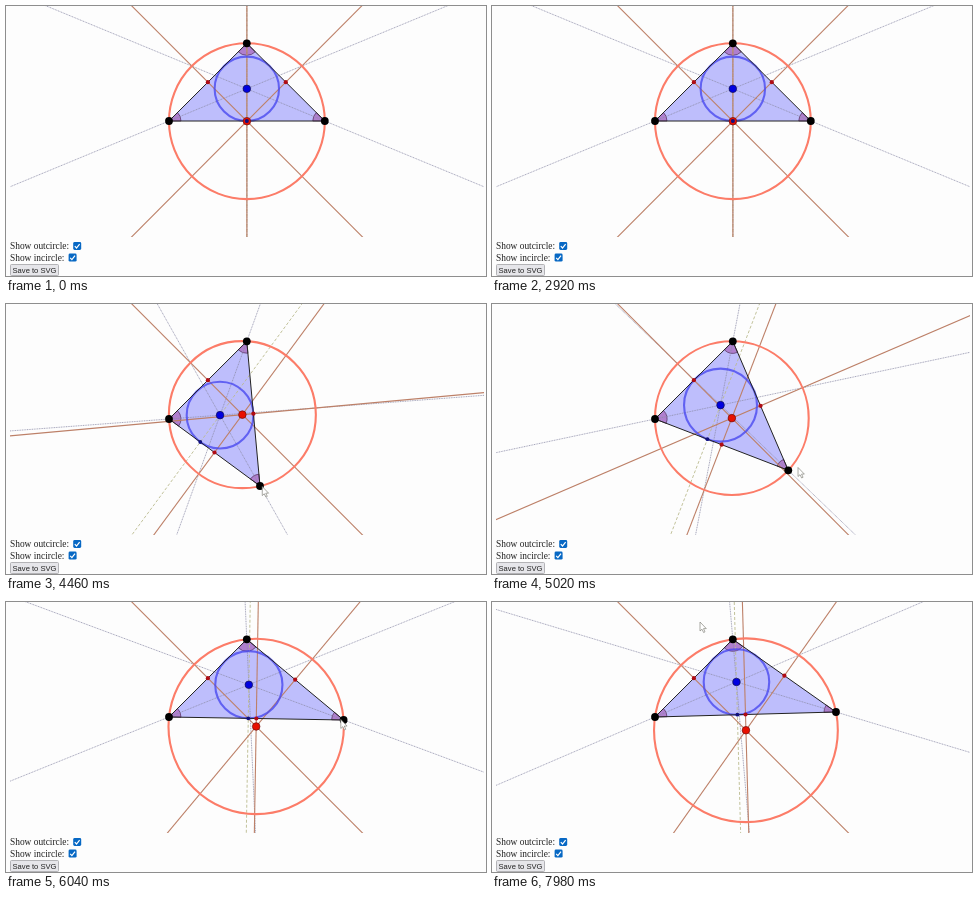
Write an HTML page that moves like this. It is 480x270 px and loops after 8 s.

```html
<!DOCTYPE html>
<html lang="en">
<head>
<meta charset="utf-8">
<title>Triangle circles</title>
<style>
  html, body { margin: 0; width: 100%; height: 100%; overflow: hidden; background: #fdfdfd; }
  svg { display: block; }
  #stage { width: 100vw; height: 100vh; }
  .label { font: 9.4px "Liberation Serif", serif; fill: #222; }
  .button { font: 7.6px "Liberation Sans", sans-serif; fill: #222; }
  #fill { fill: #bebefc; }
  .wedge { fill: #a040a080; stroke: #54305c; stroke-width: .7; }
  .bisector { stroke: #bd8068; stroke-width: 1.1; }
  .angle { stroke: #8c8ca8; stroke-width: .8; stroke-dasharray: 1 .7; }
  #drop { stroke: #bcbc90; stroke-width: .9; stroke-dasharray: 3 2; }
  #outcircle { fill: none; stroke: #fc7c68; stroke-width: 2.1; }
  #incircle { fill: none; stroke: #4848f0c8; stroke-width: 2.1; }
  #edges { fill: none; stroke: #222; stroke-width: 1; }
</style>
</head>
<body>
<svg id="stage" viewBox="0 0 480 270">
  <svg id="drawing" x="4" y="0" width="474" height="231" viewBox="4 0 474 231"></svg>
  <g class="label">
    <text x="4" y="243">Show outcircle:</text>
    <text x="4" y="254.7">Show incircle:</text>
  </g>
  <g id="box">
    <rect x="67.2" y="236" width="8" height="8" rx="1.4" fill="#0768c4"/>
    <path d="M68.8 240.2l1.7 1.8 3.1-3.9" fill="none" stroke="#fff" stroke-width="1.2"/>
  </g>
  <use href="#box" x="-4.6" y="11.6"/>
  <rect x="4.5" y="258.5" width="48" height="11" rx="1" fill="#e6e6ea" stroke="#a4a4a8" stroke-width=".8"/>
  <text class="button" x="28.5" y="267" text-anchor="middle">Save to SVG</text>
  <path id="cursor" d="M0 0V9L2 7.2 3.6 10.5 5 9.8 3.5 6.6H6.3Z" fill="#fff" stroke="#85857c" stroke-width=".7"/>
</svg>
<script>
const LOOP = 8000, GRAB = 2960, RELEASE = 7600;
const POINTER_LEAD = 80;
const A = [163, 115], B = [240.8, 37.3];
// time, x, y of the dragged corner
const drag = [
  [0, 318.8, 115], [GRAB, 318.8, 115], [3800, 294, 152], [4460, 254, 182],
  [5440, 332, 146], [5850, 342, 122], [6740, 305, 110], [RELEASE, 344, 110], [LOOP, 344, 110]
];
const drawing = document.getElementById('drawing');
const cursor = document.getElementById('cursor');

function add(tag, attrs) {
  const el = document.createElementNS('http://www.w3.org/2000/svg', tag);
  set(el, attrs);
  return drawing.appendChild(el);
}
function set(el, attrs) {
  for (const key in attrs) el.setAttribute(key, attrs[key]);
}
const times = (n, make) => Array.from({ length: n }, make);
const dot = (r, fill) => add('circle', { r, fill });

const fill = add('path', { id: 'fill' });
const wedges = times(3, () => add('path', { class: 'wedge' }));
const angleLines = times(3, () => add('path', { class: 'angle' }));
const drop = add('path', { id: 'drop' });
const bisectors = times(3, () => add('path', { class: 'bisector' }));
const outcircle = add('circle', { id: 'outcircle' });
const incircle = add('circle', { id: 'incircle' });
const edges = add('path', { id: 'edges' });
const outcentre = dot(3.8, '#e81000');
set(outcentre, { stroke: '#701010', 'stroke-width': .7 });
const midpoints = times(3, () => dot(2.1, '#b00c14'));
const touch = dot(1.9, '#101080');
const incentre = dot(3.8, '#0000e0');
set(incentre, { stroke: '#101050', 'stroke-width': .7 });
const corners = times(3, () => dot(3.9, '#000'));

const sub = (p, q) => [p[0] - q[0], p[1] - q[1]];
const along = (p, d, k) => [p[0] + d[0] * k, p[1] + d[1] * k];
const product = (p, q) => p[0] * q[0] + p[1] * q[1];
const cross = (p, q) => p[0] * q[1] - p[1] * q[0];
const unit = p => along([0, 0], p, 1 / Math.hypot(...p));
const normal = p => unit([-p[1], p[0]]);
const place = (el, p) => set(el, { cx: p[0], cy: p[1] });
const line = (el, p, d) => set(el, { d: `M${along(p, d, -700)}L${along(p, d, 700)}` });

// Smooth interpolation that never overshoots its keys
function track(keys, t, axis) {
  const slope = i => keys[i + 1] ? (keys[i + 1][axis] - keys[i][axis]) / (keys[i + 1][0] - keys[i][0]) : 0;
  const tangent = i => {
    const a = i ? slope(i - 1) : 0, b = slope(i);
    return a * b > 0 ? 2 * a * b / (a + b) : 0;
  };
  let i = 0;
  while (i < keys.length - 2 && t >= keys[i + 1][0]) i++;
  const h = keys[i + 1][0] - keys[i][0], u = Math.min(1, (t - keys[i][0]) / h), v = 1 - u;
  return v * v * (1 + 2 * u) * keys[i][axis] + u * u * (3 - 2 * u) * keys[i + 1][axis]
    + h * u * v * (v * tangent(i) - u * tangent(i + 1));
}
const position = t => [track(drag, t, 1), track(drag, t, 2)];

function drawTriangle(C) {
  const points = [A, B, C];
  const sides = points.map((_, i) => Math.hypot(...sub(points[(i + 1) % 3], points[(i + 2) % 3])));
  const perimeter = sides[0] + sides[1] + sides[2];
  const twiceArea = Math.abs(cross(sub(B, A), sub(C, A)));
  const centre = [0, 1].map(k => points.reduce((sum, p, i) => sum + p[k] * sides[i], 0) / perimeter);

  const b = sub(B, A), c = sub(C, A), bb = product(b, b), cc = product(c, c), det = 2 * cross(b, c);
  const circum = along(A, [c[1] * bb - b[1] * cc, b[0] * cc - c[0] * bb], 1 / det);

  const outline = `M${A}L${B}L${C}Z`;
  set(fill, { d: outline });
  set(edges, { d: outline });

  points.forEach((p, i) => {
    const q = points[(i + 1) % 3], r = points[(i + 2) % 3];
    const toQ = unit(sub(q, p)), toR = unit(sub(r, p));
    const sweep = cross(toQ, toR) > 0 ? 1 : 0;
    set(wedges[i], { d: `M${p}L${along(p, toQ, 12)}A12 12 0 0 ${sweep} ${along(p, toR, 12)}Z` });
    line(angleLines[i], p, unit(sub(centre, p)));
    const middle = along(p, sub(q, p), .5);
    line(bisectors[i], middle, normal(sub(q, p)));
    place(midpoints[i], middle);
    place(corners[i], p);
  });

  line(drop, centre, normal(c));
  place(touch, along(A, c, product(sub(centre, A), c) / cc));
  place(outcircle, circum);
  place(outcentre, circum);
  set(outcircle, { r: Math.hypot(...sub(circum, A)) });
  place(incircle, centre);
  place(incentre, centre);
  set(incircle, { r: twiceArea / perimeter });
}

function drawCursor(t) {
  // The pointer runs slightly ahead of the corner, then leaves it
  const held = along(position(Math.min(t + POINTER_LEAD, RELEASE)), [1, 1], 1);
  const u = Math.min(1, Math.max(0, (t - RELEASE) / 370));
  const p = along(held, sub([208, 20], held), u * u * (3 - 2 * u));
  set(cursor, { transform: `translate(${p})`, visibility: t < GRAB ? 'hidden' : 'visible' });
}

function frame() {
  const t = performance.now() % LOOP;
  drawTriangle(position(t));
  drawCursor(t);
  requestAnimationFrame(frame);
}
frame();
</script>
</body>
</html>
```
